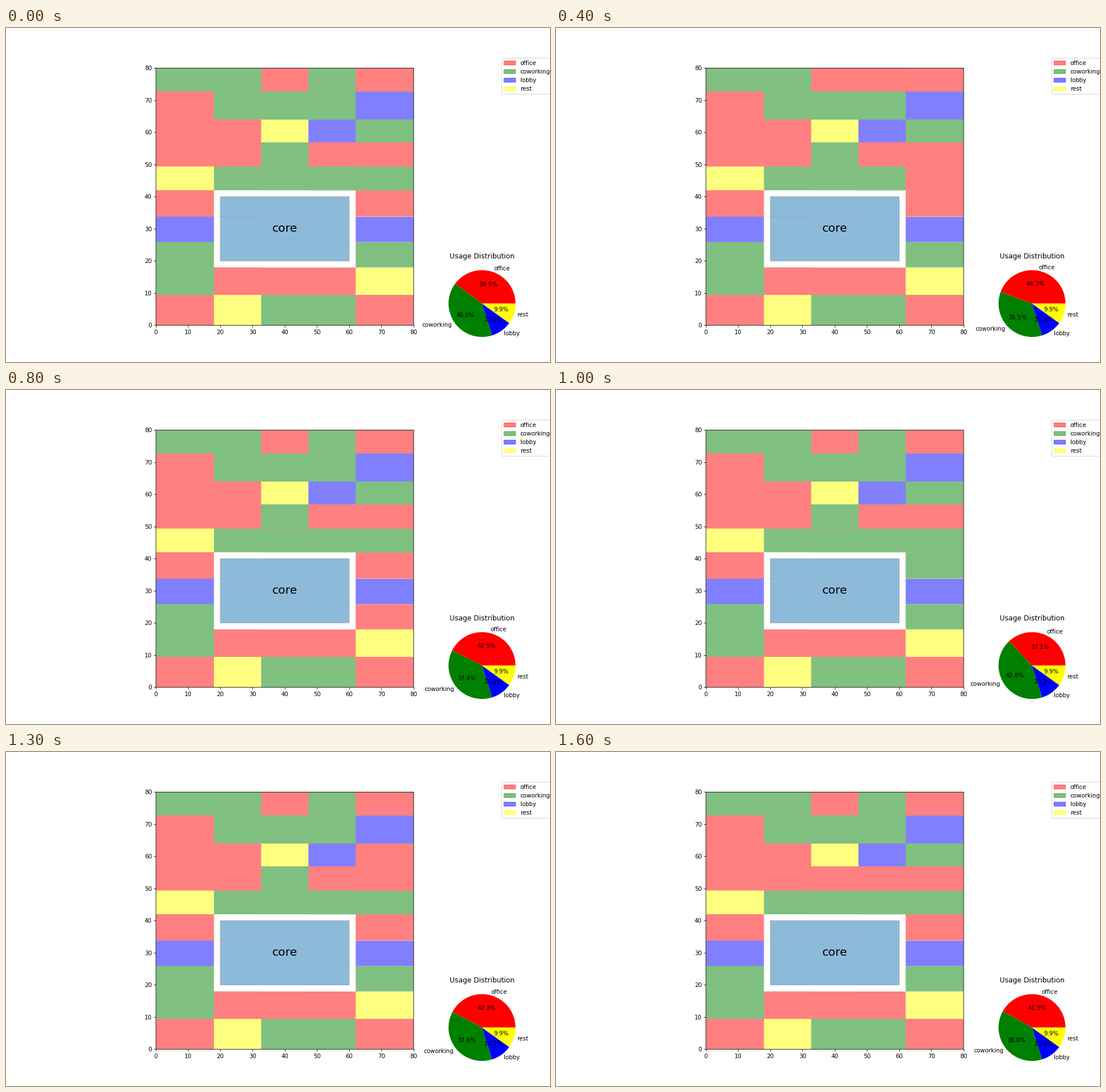
Animation of 954x587 px, one loop 1700 ms. Source, as a matplotlib script:

```python
import matplotlib.pyplot as plt
from matplotlib.animation import FuncAnimation
from matplotlib.colors import to_rgb
from matplotlib.patches import Patch, Rectangle

USES = {"R": ("office", "red"), "G": ("coworking", "green"),
        "B": ("lobby", "blue"), "Y": ("rest", "yellow")}

# Floor grid: column and row edges, then the uses from the bottom row up.
XS = [0, 18, 18 + 44 / 3, 18 + 88 / 3, 62, 80]
YS = [0, 9.45, 18, 25.9, 33.78, 42, 49.38, 56.9, 64.03, 72.75, 80]
PLAN = ["RYGGR", "GRRRY", "G---G", "B---B", "R---R",
        "YGGGG", "RRGRR", "RRYBG", "RGGGB", "GGRGR"]

# Mutations of the plan, one entry per step: (row, column, new use).
STEPS = [
    [],
    [(8, 3, "R")],
    [(2, 0, "R")],
    [(6, 3, "G")],
    [(9, 3, "R"), (5, 4, "R")],
    [(1, 2, "G")],
    [(8, 1, "R"), (5, 0, "B")],
    [(0, 3, "R")],
    [(2, 4, "R")],
    [(9, 1, "R")],
    [(4, 4, "G")],
    [(7, 3, "G"), (5, 4, "R"), (0, 2, "R")],
    [(8, 1, "R")],
    [(7, 4, "R")],
    [(9, 4, "G"), (8, 0, "G")],
    [(5, 2, "R")],
    [(6, 2, "R")],
]


def tint(color):
    """The colour at half strength on white."""
    return [(1 + v) / 2 for v in to_rgb(color)]


plt.rcParams["path.snap"] = False
fig, ax = plt.subplots(figsize=(13.002, 8), dpi=73.375)  # 954 x 587 pixels
ax.set_aspect("equal")
ax.set(xlim=(0, 80), ylim=(0, 80))
ax.set_xticks(range(0, 81, 10))
ax.set_yticks(range(0, 81, 10))

# Each cell reaches to the far corner and is covered by the ones after it,
# which leaves no seams between neighbours.
cells = {}
for r, row in enumerate(PLAN):
    for c, use in enumerate(row):
        cell = Rectangle((XS[c], YS[r]), 80 - XS[c], 80 - YS[r],
                         fc="white", lw=0)
        ax.add_patch(cell)
        if use != "-":
            cells[r, c] = cell

ax.add_patch(Rectangle((20, 20), 40, 20, fc="tab:blue", ec="gray", alpha=0.5))
ax.text(40, 30, "core", fontsize=20, ha="center", va="center")

handles = [Patch(color=color, alpha=0.5, label=name)
           for name, color in USES.values()]
ax.legend(handles=handles, loc="upper right", bbox_to_anchor=(1.55, 1.05))

pie_ax = fig.add_axes([0.75, 0.05, 0.25, 0.25])


def update(step):
    plan = {(r, c): PLAN[r][c] for r, c in cells}
    plan.update({(r, c): use for r, c, use in STEPS[step]})

    areas = dict.fromkeys(USES, 0)
    for (r, c), use in plan.items():
        cells[r, c].set_facecolor(tint(USES[use][1]))
        areas[use] += (XS[c + 1] - XS[c]) * (YS[r + 1] - YS[r])

    names, colors = zip(*USES.values())
    pie_ax.clear()
    pie_ax.pie(list(areas.values()), labels=names, colors=colors,
               autopct="%1.1f%%")
    pie_ax.set_title("Usage Distribution")


anim = FuncAnimation(fig, update, frames=len(STEPS), interval=100,
                     init_func=lambda: None, repeat=True, repeat_delay=0)
plt.show()
```
